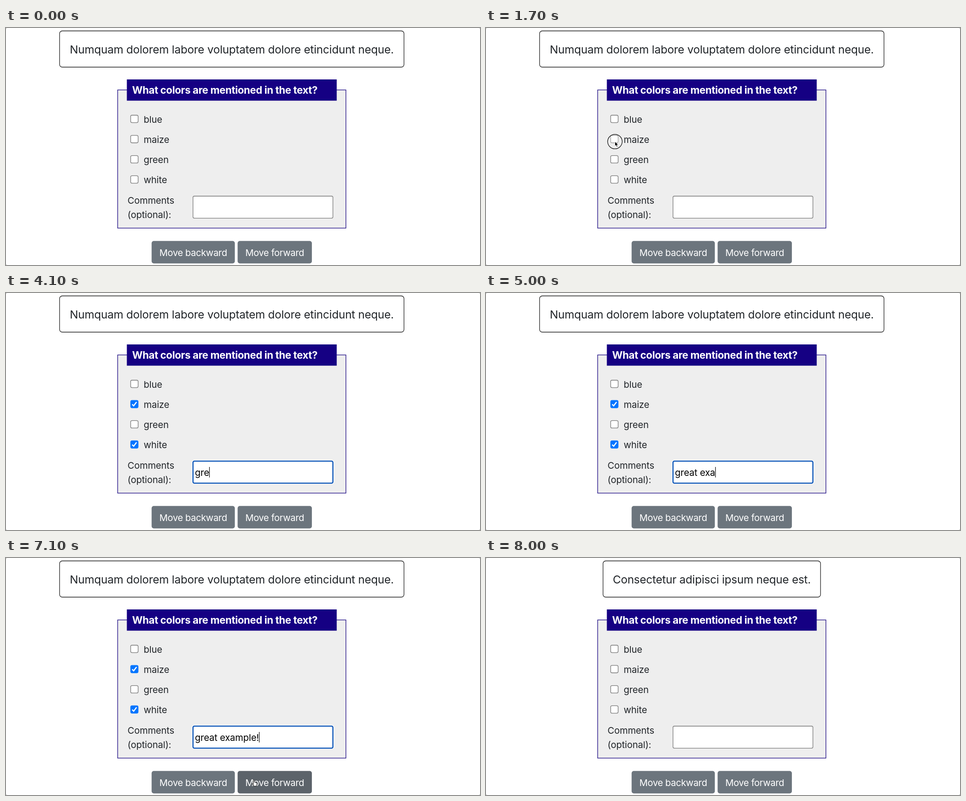
An HTML page that plays this animation: 1057x530 px, repeating every 8100 ms.

```html
<!DOCTYPE html>
<html lang="en">
<head>
<meta charset="utf-8">
<title>Annotation form</title>
<style>
  html, body { margin: 0; width: 100%; height: 100%; overflow: hidden; background: #fff; }
  svg { display: block; width: 1057px; height: 530px; }
  text {
    font: 20.6px Inter, Roboto, sans-serif;
    font-optical-sizing: none;
    letter-spacing: -.1px;
    fill: #212529;
    white-space: pre;
  }
  .middle { text-anchor: middle; }
  #title { font-size: 24.8px; letter-spacing: -.18px; }
  #legend { font-size: 22.7px; font-weight: 700; letter-spacing: -.35px; fill: #fff; }
  .button-text { letter-spacing: -.35px; fill: #fff; }
  #comment { fill: #000; }
  .outline { fill: #fff; stroke: #1c1c1c; stroke-width: 1.3; }
  .field { fill: #fff; stroke: #767676; stroke-width: 1.3; }
  .button { fill: #6c757d; }
  .tick { fill: none; stroke: #fff; stroke-width: 2.5; }
  .pointer { fill: #000; stroke: #fff; stroke-width: .9; }
  #ibeam { fill: none; stroke: #222; stroke-width: 1.1; }
  #hand { fill: #fff; stroke: #111; stroke-width: 1; stroke-linejoin: round; }
  #ripple { fill: none; stroke: #111; stroke-width: 1.3; }
  #corners { fill: #bbb; }
</style>
</head>
<body>
<svg viewBox="0 0 1057 530">
  <path id="corners" d="M0 0h2L0 2zM1057 0h-2l2 2zM0 530h2l-2-2zM1057 530h-2l2-2z"/>

  <rect id="card" class="outline" y="6.5" height="81" rx="6"/>
  <text id="title" class="middle" x="503.5" y="56.5"></text>

  <rect x="249" y="138.5" width="509" height="309" fill="#eee" stroke="#160380" stroke-width="1.3"/>
  <rect x="269.5" y="115" width="468" height="47.5" fill="#150083"/>
  <text id="legend" class="middle" x="488" y="147">What colors are mentioned in the text?</text>

  <g id="options"></g>

  <text x="271" y="392.5">Comments</text>
  <text x="271" y="424.5">(optional):</text>
  <rect id="halo" x="414.5" y="373.5" width="317" height="54" rx="5" fill="#fff"/>
  <rect id="input" class="field" x="417" y="376" width="312" height="49.3" rx="3"/>
  <text id="comment" x="421.3" y="408.7"></text>
  <rect id="caret" y="389" width="1.2" height="23.5"/>

  <rect id="ring" x="512.5" y="472.2" width="173.5" height="58.5" rx="9" fill="#b8bcc0"/>
  <rect class="button" x="324.7" y="476.3" width="185.6" height="50.2" rx="5"/>
  <rect id="forward" class="button" x="516.5" y="476.3" width="165.6" height="50.2" rx="5"/>
  <text class="middle button-text" x="417.5" y="509.5">Move backward</text>
  <text class="middle button-text" x="599.2" y="509.5">Move forward</text>

  <g id="cursor">
    <circle id="ripple" r="16.2"/>
    <path id="arrow" class="pointer" d="M0 0V10.2L2.4 8 4 11.8 6 11 4.4 7.2H7.6Z"/>
    <path id="ibeam" d="M-3 -5.5Q0 -5.5 0 -3.5Q0 -5.5 3 -5.5M0 -4V4M-3 5.5Q0 5.5 0 3.5Q0 5.5 3 5.5M-1.5 2H1.5"/>
    <path id="hand" d="M-1.8 6V-5.6Q-1.8 -7-.6 -7T.6 -5.6V-1.2Q2 -2 2.7 -.6Q4.2 -1.1 4.8 .2Q6.6 -.1 6.4 2L5.4 7.5H-.6L-4.4 2.6Q-4.7 .6-1.8 2.4"/>
  </g>
</svg>
<script>
const LOOP = 8100, STEP = 100;
const $ = id => document.getElementById(id);
const show = (id, on) => $(id).setAttribute('visibility', on ? 'visible' : 'hidden');
const within = (t, from, to) => t >= from && t < to;

const options = [
  { label: 'blue' },
  { label: 'maize', press: 1600, check: 1800 },
  { label: 'green' },
  { label: 'white', press: 2600, check: 2800 },
];
$('options').innerHTML = options.map(({ label }, i) => {
  const y = 203.3 + i * 45.15;
  return `<rect id="box${i}" class="field" x="278" y="${y - 8.3}" width="16.6" height="16.6" rx="3"/>
    <path id="tick${i}" class="tick" d="M281.3 ${y + .4}l3.4 3.5 6.4 -8.6"/>
    <text x="307" y="${y + 8.6}">${label}</text>`;
}).join('');

const titles = [
  { text: 'Numquam dolorem labore voluptatem dolore etincidunt neque.', width: 768 },
  { text: 'Consectetur adipisci ipsum neque est.', width: 485 },
];

const comment = 'great example!';
const keyTimes = [3900, 4000, 4100, 4300, 4400, 4500, 4700, 4900, 5000, 5100, 5300, 5500, 5600, 5900];

const focusStart = 3200, submitPress = 7400, nextPage = 7700, leave = 7900;

// Pointer path: time, x, y
const entering = [
  [100, 385, 353], [500, 335, 300], [900, 293, 258], [1400, 287.5, 254], [1900, 287.5, 254],
  [2500, 293, 332], [2800, 293, 332], [3100, 467.5, 399], [3900, 467.5, 399],
];
const submitting = [
  [6300, 536, 420], [6500, 553, 500], [7000, 553, 500], [7300, 554, 510], [7900, 554, 510],
];

function along(path, t) {
  const i = Math.max(1, path.findIndex(p => p[0] > t));
  const [a, b] = [path[i - 1], path[i]];
  const k = (t - a[0]) / (b[0] - a[0]);
  const eased = k * k * (3 - 2 * k);
  return [a[1] + (b[1] - a[1]) * eased, a[2] + (b[2] - a[2]) * eased];
}

function drawPointer(t) {
  const path = [entering, submitting].find(p => within(t, p[0][0], p.at(-1)[0]));
  const pos = path ? along(path, t) : [0, 0];
  const overInput = pos[0] > 417 && pos[1] > 376 && pos[1] < 425;
  const overButton = pos[1] > 476;
  $('cursor').setAttribute('transform', `translate(${pos})`);
  show('arrow', path && !overInput && !overButton);
  show('ibeam', path && overInput);
  show('hand', path && overButton);
  show('ripple', within(t, 1600, 1800) || within(t, 2600, 2800) || t === 7500);
  return { overInput: path && overInput, overButton: path && overButton };
}

function render(t) {
  const next = t >= nextPage;
  const { text, width } = titles[+next];
  $('title').textContent = text;
  $('card').setAttribute('x', 503.5 - width / 2);
  $('card').setAttribute('width', width);

  options.forEach(({ press, check }, i) => {
    const checked = t >= check && !next;
    const pressed = within(t, press, check);
    $('box' + i).style.cssText = checked ? 'fill:#0075ff;stroke:#0075ff' : pressed ? 'stroke:#a0a0a0' : '';
    show('tick' + i, checked);
  });

  const { overInput, overButton } = drawPointer(t);
  const focused = within(t, focusStart, submitPress);
  show('halo', focused);
  $('input').style.cssText = focused ? 'stroke:#0f57b8;stroke-width:2.6' : overInput ? 'stroke:#4f4f4f' : '';

  const typed = next ? 0 : keyTimes.filter(k => k <= t).length;
  $('comment').textContent = comment.slice(0, typed);
  const caretX = 421.3 + (typed ? $('comment').getComputedTextLength() : .5);
  $('caret').setAttribute('x', caretX);
  show('caret', focused && !within(t, 3700, 3900) && !within(t, 6400, 7000));

  show('ring', within(t, submitPress, nextPage));
  $('forward').style.fill = overButton ? '#5c636a' : t === leave ? '#646c73' : '';
}

let last = -1;
function tick(now) {
  const t = Math.floor(now % LOOP / STEP) * STEP;
  if (t !== last) render(last = t);
  requestAnimationFrame(tick);
}
render(0);
const start = performance.now();
requestAnimationFrame(function loop() {
  tickFrom(performance.now() - start);
  requestAnimationFrame(loop);
});
function tickFrom(elapsed) {
  const t = Math.floor(elapsed % LOOP / STEP) * STEP;
  if (t !== last) render(last = t);
}
</script>
</body>
</html>
```
